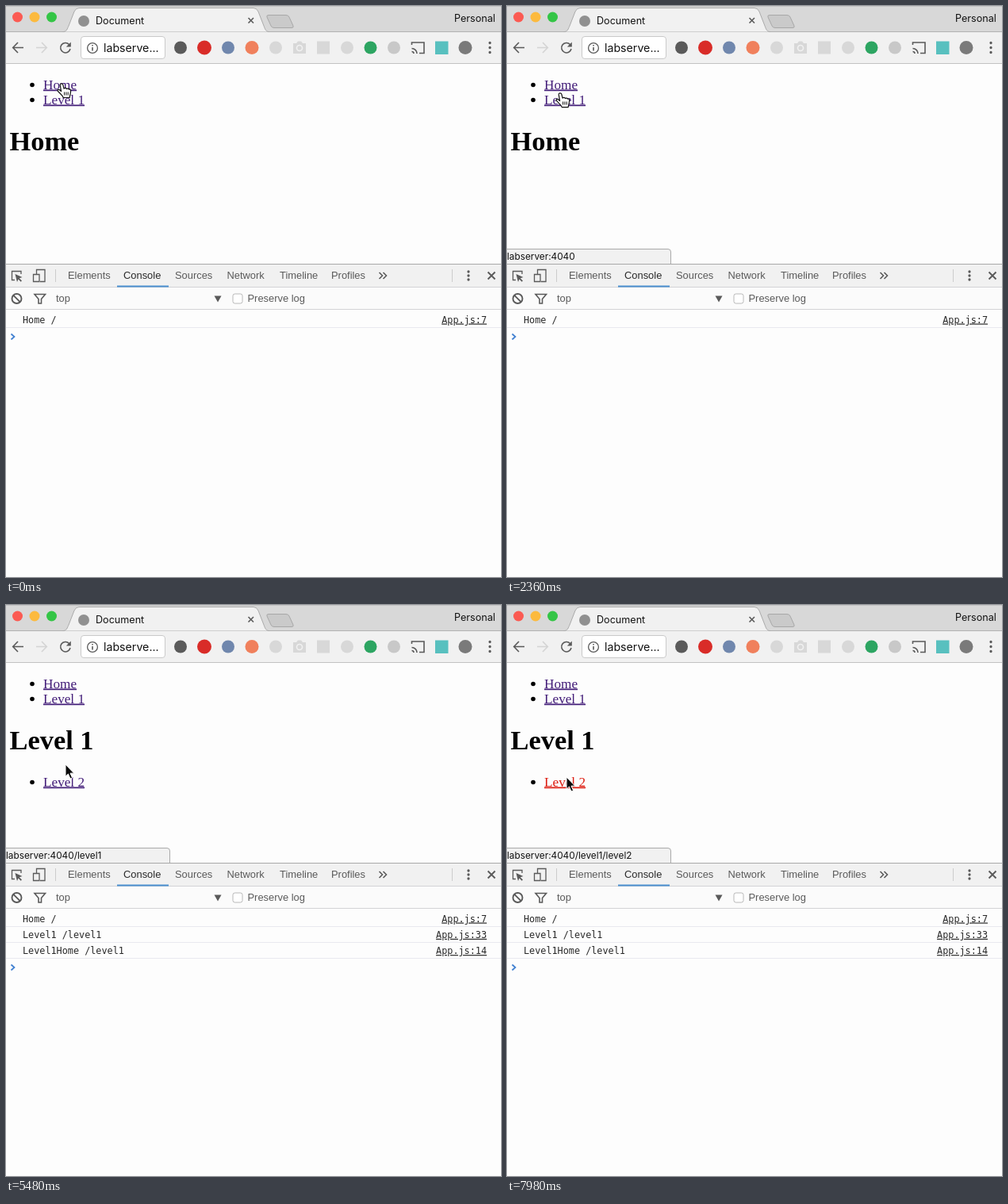
These frames come from a looping animation (624x720 px, 8 s). An HTML page:

```html
<!DOCTYPE html>
<html lang="en">
<head>
<meta charset="utf-8">
<title>Nested routes</title>
<style>
  html, body { margin: 0; width: 100%; height: 100%; overflow: hidden; background: #fdfdfd; }
  svg { display: block; width: 624px; height: 720px; }
  text { white-space: pre; }
  .ui { font: 12.6px Inter, sans-serif; fill: #111; }
  .url { font-size: 14.2px; }
  .status { font-size: 11.8px; }
  .tools { font: 12.9px "Liberation Sans", Arial, sans-serif; fill: #5a5a5a; }
  .tools .on { fill: #2a2a2a; }
  .page { font: 17.2px "Liberation Serif", Times, serif; fill: #000; }
  .page .h1 { font-size: 34.4px; font-weight: bold; }
  .link { fill: #421c78; text-decoration: underline; }
  .link.active { fill: #dd1c10; }
  .log { font: 11.8px "DejaVu Sans Mono", Menlo, monospace; fill: #2a2a2a; }
  .log .src { text-anchor: end; text-decoration: underline; }
  .line { fill: none; stroke: #5a5a5a; stroke-width: 1.6; }
  .thin { stroke-width: 1.3; }
  .thick { stroke-width: 1.9; }
  .dots { stroke: #5a5a5a; stroke-width: 3.3; stroke-linecap: round; }
  .bar { fill: #f1f1f1; }
  .faint { fill: #d8d8d8; }
</style>
</head>
<body>
<svg viewBox="0 0 624 720">
  <rect width="624" height="720" fill="#fdfdfd"/>

  <!-- window and tab strip -->
  <rect width="624" height="33" fill="#d8d8d8"/>
  <path d="M0 .5H624" stroke="#c4c4c4"/>
  <path d="M0 32.5H624" stroke="#b2b2b2"/>
  <path class="bar" d="M71 33C77 32 77 29 79 25L86 7Q88 2.5 92 2.5H312Q316 2.5 318 7L325 25C327 30 327 32 333 33Z" stroke="#aaa"/>
  <rect class="bar" y="33" width="624" height="39"/>
  <path d="M0 72.5H624" stroke="#c2c2c2"/>
  <circle cx="14.5" cy="14" r="6.5" fill="#fb5a52"/>
  <circle cx="36" cy="14" r="6.5" fill="#fcba3e"/>
  <circle cx="57.5" cy="14" r="6.5" fill="#34c546"/>
  <path d="M331 11.5H353Q356 11.5 357 14L362 25Q363 27.5 360 27.5H338Q335 27.5 334 25L329 14Q328 11.5 331 11.5Z" fill="#cacaca" stroke="#a8a8a8"/>
  <circle cx="98" cy="19" r="7" fill="#909090"/>
  <path class="line" d="M305.5 15L312 21.5M312 15L305.5 21.5"/>
  <g class="ui">
    <text x="113" y="22.5">Document</text>
    <text x="565" y="19.5">Personal</text>
  </g>

  <!-- toolbar -->
  <path class="line" d="M22 52.5H9M15 46L8.7 52.5L15 59"/>
  <path class="line" d="M38 52.5H51M45 46L51.3 52.5L45 59" style="stroke:#d4d4d4"/>
  <path class="line" d="M79.5 48.5A6.2 6.2 0 1 0 81 54"/>
  <path d="M81.8 45.5V51.5H75.8Z" fill="#5a5a5a"/>
  <rect x="94.5" y="38.5" width="106" height="28" rx="3.5" fill="#fff" stroke="#cacaca"/>
  <circle class="line thin" cx="109" cy="53" r="6.4"/>
  <path class="line" d="M109 52V56.5M109 49V50.6"/>
  <text class="ui url" x="123" y="58">labserve...</text>
  <circle cx="220" cy="52.5" r="8" fill="#5a5a5a"/>
  <circle cx="250" cy="52.5" r="9" fill="#d92c28"/>
  <circle cx="280" cy="52.5" r="8" fill="#7087ad"/>
  <circle cx="310" cy="52.5" r="8.5" fill="#f0805c"/>
  <circle class="faint" cx="340" cy="52.5" r="8"/>
  <path class="faint" d="M362 47H366L368 44.5H372L374 47H378V60H362Z"/>
  <circle cx="370" cy="53" r="3.5" fill="none" stroke="#f1f1f1" stroke-width="1.6"/>
  <rect class="faint" x="392" y="44.5" width="16" height="16"/>
  <circle class="faint" cx="430" cy="52.5" r="8"/>
  <circle cx="459.5" cy="52.5" r="8" fill="#2da562"/>
  <circle cx="489" cy="52.5" r="8" fill="#c8c8c8"/>
  <path class="line" d="M511.5 49V46H527V59.5H521M511.5 57.5A2.5 2.5 0 0 1 514 60M511.5 53.5A6.5 6.5 0 0 1 518 60"/>
  <rect x="541" y="44.5" width="16.5" height="16.5" fill="#58c0bf"/>
  <circle cx="579" cy="52.5" r="8.5" fill="#7a7a7a"/>
  <path class="dots" d="M610 46.5v.01M610 52.5v.01M610 58.5v.01"/>

  <!-- page -->
  <g class="page">
    <circle cx="33" cy="99.5" r="2.8"/>
    <circle cx="33" cy="118.5" r="2.8"/>
    <text class="link" x="47" y="104.5">Home</text>
    <text class="link" id="link1" x="47" y="123.5">Level 1</text>
    <text class="h1" id="heading" x="4.5" y="181.5">Home</text>
    <g id="nested">
      <circle cx="33" cy="223.5" r="2.8"/>
      <text class="link" id="link2" x="47" y="228.5">Level 2</text>
    </g>
  </g>
  <g id="bubble">
    <path class="bar" d="M-1 306.5H203Q206.5 306.5 206.5 310V325.5H-1Z" stroke="#aaa"/>
    <text class="ui status" id="address" x="0" y="319.5"></text>
  </g>

  <!-- developer tools -->
  <rect class="bar" y="325" width="624" height="29"/>
  <rect y="355" width="624" height="27" fill="#fbfbfb"/>
  <path d="M0 325.5H624" stroke="#a8a8a8"/>
  <path d="M0 354.5H624M0 382.5H624" stroke="#d3d3d6"/>
  <rect x="140" y="352.5" width="65" height="2" fill="#4a8fd0"/>
  <path d="M62.5 332V348M562.5 332V348" stroke="#ccc"/>
  <path class="line thin" d="M11 345.5H7.5V334.5H19V338"/>
  <path d="M11.5 338L20.5 342L16.8 343.3L20 346.5L18.6 347.8L15.6 344.6L14 348Z" fill="#5a5a5a"/>
  <path class="line thin" d="M38.5 338V332.5H49V347.5H43M34.5 338.5H42V347.5H34.5Z"/>
  <path class="line" d="M470.5 336L474.5 340L470.5 344M475.5 336L479.5 340L475.5 344"/>
  <path class="dots" d="M583 335v.01M583 340v.01M583 345v.01"/>
  <path class="line thick" d="M607.5 335.5L616.5 344.5M616.5 335.5L607.5 344.5"/>
  <circle class="line thick" cx="13.5" cy="369" r="6"/>
  <path class="line thick" d="M9.3 364.8L17.7 373.2"/>
  <path class="line" d="M36 363.5H49.5L44.5 369.5V375H41V369.5Z"/>
  <path d="M262.5 365.5H271.5L267 373.5Z" fill="#5a5a5a"/>
  <rect x="286" y="363" width="12" height="12" rx="2.5" fill="#fff" stroke="#b8b8b8"/>
  <g class="tools">
    <text x="78" y="344">Elements</text>
    <text class="on" x="148" y="344">Console</text>
    <text x="213" y="344">Sources</text>
    <text x="278.5" y="344">Network</text>
    <text x="345" y="344">Timeline</text>
    <text x="410" y="344">Profiles</text>
    <text x="63" y="373">top</text>
    <text x="304.5" y="373">Preserve log</text>
  </g>
  <g class="log" id="log"></g>
  <path id="prompt" d="M6.5 -3.5L10.5 0L6.5 3.5" fill="none" stroke="#3f7fd0" stroke-width="1.7"/>

  <g id="hand" stroke="#111" stroke-width="1.2" stroke-linejoin="round">
    <path fill="#fff" d="M-1.8 1.6C-2 -.6 1.4 -.8 1.9 1.4L3 6.2C4 5 6 5.2 6.4 6.6C7.4 5.6 9 6 9.3 7.2C10.4 6.6 11.6 7.3 11.6 8.8C11.7 12 10.6 13.5 10.2 17.5H2.2C1.4 14.5 -2 12.5 -4.8 9.2C-5.6 7.8 -4 6.8 -2.6 7.8L-.4 9.6Z"/>
    <path d="M3.6 10.5V14.5M5.9 10.5V14.5M8.2 10.5V14.5" stroke-width="1"/>
  </g>
  <path id="arrow" d="M0 0V15.2L3.4 12L6 18L8.6 16.9L6 11.1H10.7Z" fill="#0a0a0a" stroke="#fff"/>
</svg>
<script>
const LOOP = 8000;
const HOST = 'labserver:4040';
const OPENED = 3620;
const $ = id => document.getElementById(id);

// time, x, y of the pointer tip
const path = [
  [0, 70, 98], [820, 68, 99.5], [1500, 68, 101], [2360, 67, 110], [2750, 66, 120],
  [4200, 66, 121], [4600, 67, 125], [5480, 75, 201], [6000, 75, 217],
  [6880, 75, 219.5], [8000, 75, 217]
];

const statuses = [[0, ''], [2540, '/level1'], [5900, '/level1/level2']];
const presses = [[3500, OPENED, 'link1'], [7900, LOOP, 'link2']];
const rows = [['Home /', 7], ['Level1 /level1', 33], ['Level1Home /level1', 14]];

$('log').innerHTML = rows.map(([message, line], i) => {
  const y = 399.5 + i * 20.3;
  return `<g><text x="21" y="${y}">${message}</text>
    <text class="src" x="606" y="${y}">App.js:${line}</text>
    <path d="M0 ${Math.round(y + 5) + .5}H624" stroke="#e9e9ef"/></g>`;
}).join('');

const show = (node, visible) => node.setAttribute('visibility', visible ? 'visible' : 'hidden');
const setText = (node, value) => { if (node.textContent !== value) node.textContent = value; };

function pointerAt(t) {
  const i = path.findIndex(step => step[0] > t);
  const [t0, x0, y0] = path[i - 1], [t1, x1, y1] = path[i];
  const k = (t - t0) / (t1 - t0);
  return [x0 + (x1 - x0) * k, y0 + (y1 - y0) * k];
}

function draw(t) {
  const opened = t >= OPENED;
  const [x, y] = pointerAt(t);
  const pressed = presses.find(([from, to]) => t >= from && t < to);
  const overLink = y < 128 || y > 212;

  for (const id of ['hand', 'arrow']) {
    $(id).setAttribute('transform', `translate(${x} ${y})`);
    show($(id), (id === 'hand') === (overLink && !pressed));
  }
  for (const id of ['link1', 'link2']) {
    $(id).classList.toggle('active', !!pressed && pressed[2] === id);
  }

  setText($('heading'), opened ? 'Level 1' : 'Home');
  show($('nested'), opened);
  [...$('log').children].forEach((row, i) => show(row, i === 0 || opened));
  $('prompt').setAttribute('transform', `translate(0 ${opened ? 457 : 417})`);

  const [, route] = statuses.filter(step => step[0] <= t).pop();
  setText($('address'), HOST + route);
  $('bubble').setAttribute('opacity', Math.min(1, Math.max(0, (t - 100) / 140)));
}

const start = performance.now();
function tick() {
  draw((performance.now() - start) % LOOP);
  requestAnimationFrame(tick);
}
tick();
</script>
</body>
</html>
```
